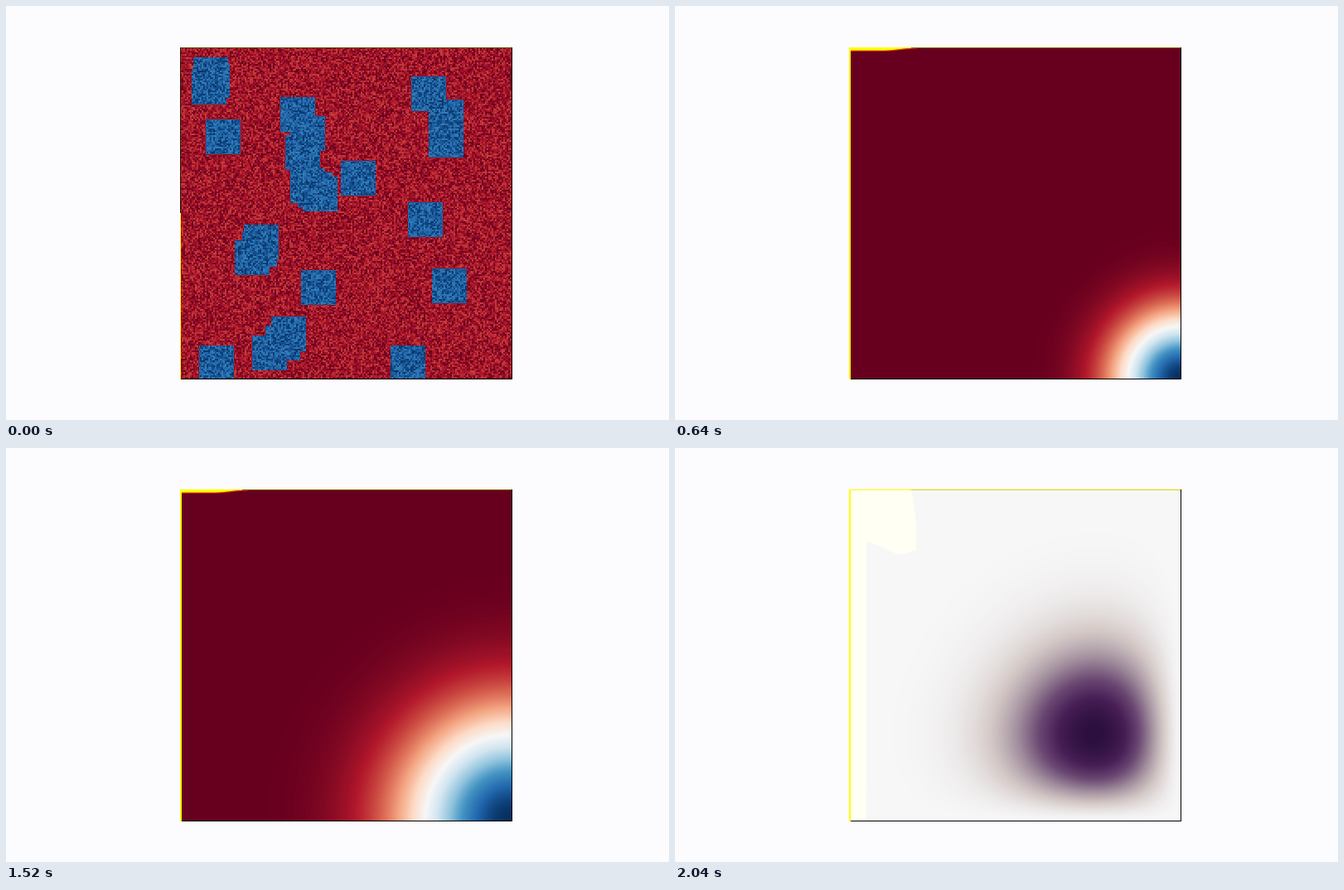
A matplotlib script for the animation above (2.08 s loop, 800 by 500 pixels).

```python
import matplotlib.pyplot as plt
import numpy as np
from matplotlib.animation import FuncAnimation
from matplotlib.colors import LinearSegmentedColormap
from matplotlib.patches import Rectangle

STEP, FRAMES, SWITCH = 40, 52, 40
LEFT, TOP, SIZE, PATCH = 210, 50, 400, 42
YELLOW = "#ffff00"

red_blue = plt.get_cmap("RdBu")
violet = LinearSegmentedColormap.from_list(
    "violet", ["#f7f7f8", "#d3c8c6", "#a08c9c", "#6c4a74", "#481f56", "#2c0f3e"])

# Single patches, and trails of three between two ends
SINGLES = [(242, 137), (405, 187), (486, 237), (357, 319),
           (515, 317), (234, 410), (465, 410)]
TRAILS = [((227, 62), (225, 77)), ((332, 110), (338, 156)),
          ((344, 196), (359, 206)), ((490, 85), (511, 141)),
          ((288, 264), (277, 283)), ((321, 375), (298, 398))]

# Distances from the bottom right corner, per pixel
axis = np.arange(SIZE) + 0.5
dx = (SIZE - axis)[None, :]
dy = (SIZE - axis)[:, None]


def trail(start, end):
    """Three patches, the middle one pushed to the right."""
    (x0, y0), (x1, y1) = start, end
    middle = ((x0 + x1) / 2 + 0.2 * (y1 - y0), (y0 + y1) / 2)
    return [start, middle, end]


def seed_field():
    rng = np.random.default_rng(4)
    noise = np.kron(rng.random((SIZE // 2, SIZE // 2)), np.ones((2, 2)))
    field = 0.16 * noise
    for x, y in SINGLES + sum((trail(*ends) for ends in TRAILS), []):
        i, j = int(y) - TOP, int(x) - LEFT - 1
        box = np.s_[i:i + PATCH, j:j + PATCH]
        field[box] = 0.84 + 0.15 * noise[box]
    return field


def blur(field, sigma):
    kernel = np.exp(-0.5 * ((axis[:, None] - axis[None, :]) / sigma) ** 2)
    kernel /= kernel.sum(axis=1, keepdims=True)
    return kernel @ field @ kernel.T


def corner_field(t):
    half = 1.54 * t ** 0.575
    return 0.5 ** ((dx ** 2 + dy ** 2) / half ** 2)


def spot_field(t):
    peak = 98 * (t / 1840) ** 0.6

    def hump(d):
        q = (d / peak) ** 2
        return (q * np.exp(1 - q)) ** 0.72

    return hump(dx) * hump(dy)


start = seed_field()

fig = plt.figure(figsize=(8, 5), dpi=100, facecolor="#fcfcff")
ax = fig.add_axes([0, 0, 1, 1])
ax.axis("off")
image = ax.imshow(start, cmap=red_blue, vmin=0, vmax=1, interpolation="nearest",
                  extent=(LEFT, LEFT + SIZE, TOP + SIZE, TOP), aspect="auto")
ax.set_xlim(0, 800)
ax.set_ylim(500, 0)


def bar(x, y, w, h, color):
    return ax.add_patch(Rectangle((x, y), w, h, fc=color, lw=0,
                                  antialiased=False, zorder=4))


# Pale strip on the left with a rounded lobe at the top
x = np.linspace(LEFT + 1, 291, 400)
lobe = 114 + 14 * np.sin(np.pi / 2 * (x - 231) / 42) ** 2
pale = ax.fill_between(x, 51 + 45 * np.clip((x - 284) / 7, 0, 1) ** 2,
                       np.where(x < 231, TOP + SIZE, lobe),
                       fc="#fffff4", lw=0, zorder=2)

# Thin yellow wedge along the top edge
slope = np.clip((x - 250) / 42, 0, 1)
wedge_y = TOP + 0.5 + 1.6 * (1 + np.cos(np.pi * slope))
wedge = ax.fill_between(x, TOP, wedge_y, fc=YELLOW, lw=0, zorder=3)
rim, = ax.plot(x[5:], wedge_y[5:] + 0.5, color="#e03010", lw=0.9, zorder=2.5)

top = bar(LEFT, TOP, SIZE + 1, 1, "black")
bar(LEFT + SIZE, TOP, 1, SIZE + 1, "black")
bar(LEFT, TOP + SIZE, SIZE + 1, 1, "black")
side_dark = bar(LEFT, TOP, 1, SIZE / 2, "#202000")
side = bar(LEFT, TOP, 2, SIZE + 1, YELLOW)
top_left = bar(LEFT, TOP, 75, 1, YELLOW)


def update(k):
    t = k * STEP
    first, late = k == 0, k >= SWITCH
    if first:
        field = start
    elif late:
        field = spot_field(t)
    else:
        field = corner_field(t)
        if k < 5:
            rest = blur(start, 8 * k ** 0.5) * np.exp(-0.9 * k)
            field = np.maximum(field, rest)
    image.set_data(field)
    image.set_cmap(violet if late else red_blue)
    pale.set_visible(late)
    for part in (wedge, rim):
        part.set_visible(not first and not late)
    top_left.set_visible(not first)
    side_dark.set_visible(first)
    gap = SIZE / 2 if first else 0
    side.set_bounds(LEFT, TOP + gap, 1 if first else 2, SIZE + 1 - gap)
    top.set_facecolor("#d8d800" if late else "#504800" if first else "#807000")
    return []


anim = FuncAnimation(fig, update, frames=FRAMES, interval=STEP,
                     repeat=True, repeat_delay=0, blit=False)
plt.show()
```
